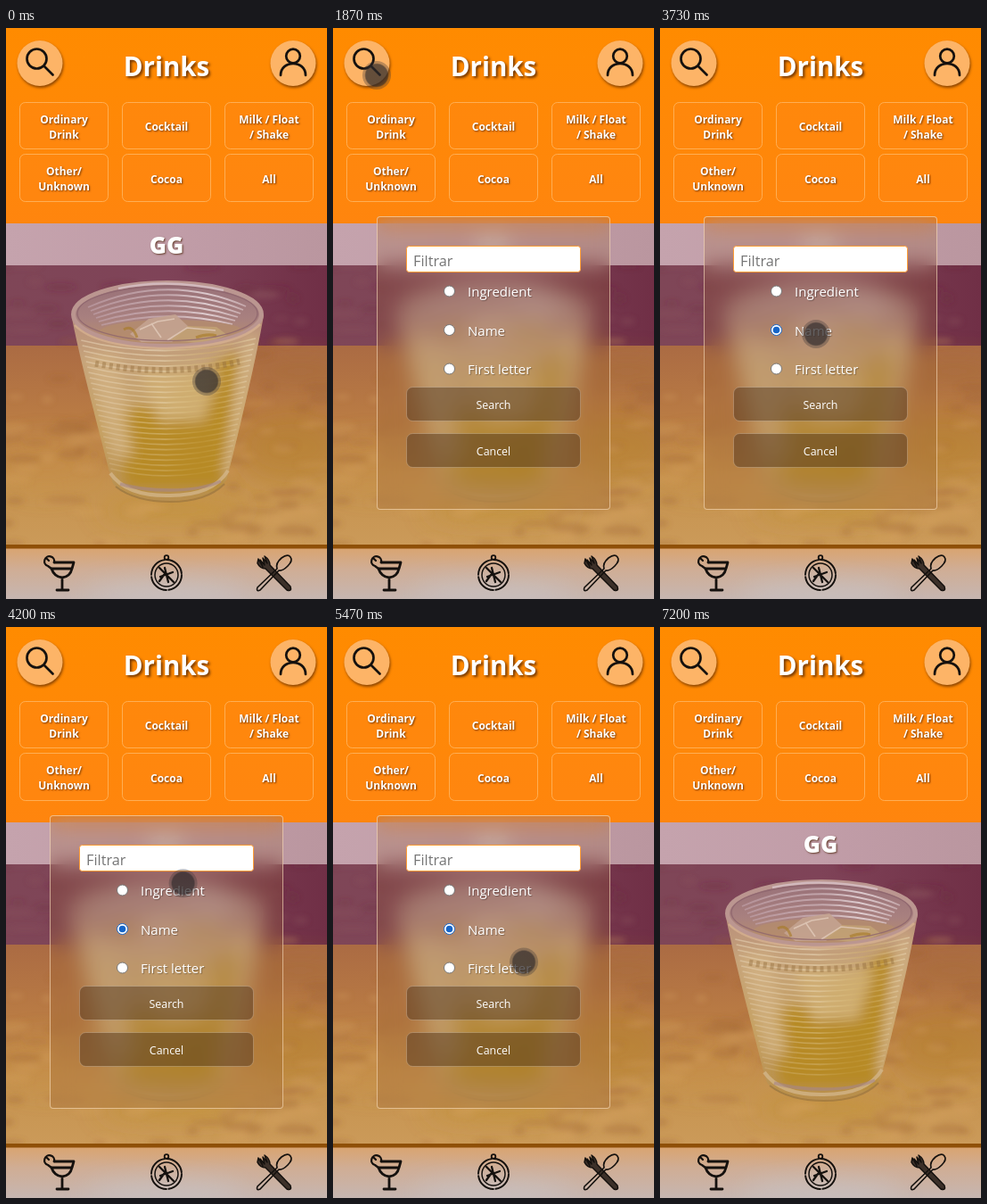
An HTML page that plays this animation: 360 by 640 pixels, repeating every 7470 ms.

```html
<!DOCTYPE html>
<html lang="en">
<head>
<meta charset="utf-8">
<title>Drinks</title>
<style>
  html, body { margin: 0; width: 100%; height: 100%; overflow: hidden; background: #ff8a06; }
  #stage { position: relative; width: 360px; height: 640px; overflow: hidden; font-family: "Open Sans", "Noto Sans", sans-serif; }
  svg { position: absolute; left: 0; top: 0; display: block; }
  text { fill: #fff; }
  .mid { text-anchor: middle; }
  .bold { font-weight: 700; text-shadow: 1px 1px 2px rgba(70, 30, 0, .75); }
  .cat { font-size: 12px; }
  .label { font-size: 15px; text-shadow: 1px 1px 1px rgba(0, 0, 0, .3); }
  .action { font-size: 12.4px; }
  .icon { fill: none; stroke: #15110e; stroke-linecap: round; stroke-linejoin: round; }
  .round { fill: #fdb467; filter: drop-shadow(1px 2px 1.5px rgba(90, 40, 0, .7)); }
  #glassPane {
    position: absolute; box-sizing: border-box; left: 49px; top: 211px; width: 262px; height: 329px;
    border: 1px solid rgba(255, 228, 195, .6); border-radius: 4px;
    background: rgba(150, 95, 50, .24); backdrop-filter: blur(12px);
  }
  #dialog { visibility: hidden; }
  #cursor {
    position: absolute; left: -16px; top: -16px; width: 32px; height: 32px; border-radius: 50%;
    background: radial-gradient(circle closest-side, rgba(46, 42, 44, .74) 0 76%, rgba(60, 54, 56, .34) 86% 100%);
  }
</style>
</head>
<body>
<div id="stage">
  <svg width="360" height="640" viewBox="0 0 360 640">
    <defs>
      <linearGradient id="head" x2="0" y2="1"><stop stop-color="#ff8b00"/><stop offset="1" stop-color="#ff850e"/></linearGradient>
      <linearGradient id="wall"><stop stop-color="#7f4657"/><stop offset=".5" stop-color="#7f4358"/><stop offset="1" stop-color="#702f46"/></linearGradient>
      <linearGradient id="table" x2="0" y2="1"><stop stop-color="#ab6b43"/><stop offset=".35" stop-color="#b97b44"/><stop offset=".7" stop-color="#c6934f"/><stop offset="1" stop-color="#cb9a59"/></linearGradient>
      <linearGradient id="bar"><stop stop-color="#c5a3ad"/><stop offset=".5" stop-color="#c19dA8"/><stop offset="1" stop-color="#ba969f"/></linearGradient>
      <linearGradient id="nav" x2="0" y2="1"><stop stop-color="#d9a470"/><stop offset=".4" stop-color="#d0ad94"/><stop offset="1" stop-color="#c6b6b1"/></linearGradient>
      <linearGradient id="body" x2="0" y2="1"><stop stop-color="#b98f7c"/><stop offset=".25" stop-color="#c5a279"/><stop offset=".6" stop-color="#c5a060"/><stop offset="1" stop-color="#b88f50"/></linearGradient>
      <linearGradient id="rib"><stop stop-color="#e6d2b4"/><stop offset=".45" stop-color="#efe0c2"/><stop offset=".75" stop-color="#d6b566" stop-opacity=".6"/><stop offset="1" stop-color="#ead9b8"/></linearGradient>
      <linearGradient id="backRib" gradientUnits="userSpaceOnUse" x1="90" x2="270"><stop stop-color="#bb9aa2"/><stop offset=".5" stop-color="#cdb4ba"/><stop offset=".75" stop-color="#f1e6ea"/><stop offset="1" stop-color="#cfb5b8"/></linearGradient>
      <linearGradient id="inside" x2="0" y2="1"><stop stop-color="#987078"/><stop offset=".55" stop-color="#a8807f"/><stop offset="1" stop-color="#b98f6c"/></linearGradient>
      <filter id="soft" x="-50%" y="-80%" width="200%" height="260%"><feGaussianBlur stdDeviation="14"/></filter>
      <filter id="blur7" x="-50%" y="-50%" width="200%" height="200%"><feGaussianBlur stdDeviation="7"/></filter>
      <filter id="blur3"><feGaussianBlur stdDeviation="3"/></filter>
      <clipPath id="photo"><path d="M0 219H360V580H0Z"/></clipPath>
      <path id="cup" d="M74 325C80 360 109 470 119 508C130 538 237 538 248 504C257 470 281 370 289 322Z"/>
      <clipPath id="inCup"><use href="#cup"/></clipPath>
    </defs>

    <g clip-path="url(#photo)">
      <path d="M0 219H360V358H0Z" fill="url(#wall)"/>
      <path d="M0 356H360V580H0Z" fill="url(#table)"/>
      <g filter="url(#soft)">
        <ellipse cx="320" cy="470" rx="60" ry="40" fill="#b5812f" opacity=".5"/>
        <ellipse cx="45" cy="490" rx="60" ry="28" fill="#c88f48" opacity=".5"/>
        <ellipse cx="330" cy="385" rx="60" ry="15" fill="#a4683a" opacity=".5"/>
        <ellipse cx="190" cy="540" rx="85" ry="12" fill="#c09236" opacity=".7"/>
      </g>
      <g id="mottle" filter="url(#blur3)"></g>

      <use href="#cup" fill="url(#body)"/>
      <g clip-path="url(#inCup)">
        <g filter="url(#blur7)">
          <path d="M165 425L262 360L242 515H136L122 430Z" fill="#b78a22" opacity=".95"/>
          <path d="M150 385H240L222 440H172Z" fill="#d0ae74" opacity=".95"/>
          <path d="M90 365H125L142 480H120Z" fill="#d3b282" opacity=".8"/>
          <path d="M276 345L250 500" stroke="#d5b584" stroke-width="10"/>
        </g>
        <g id="ridges" fill="none" stroke="url(#rib)"></g>
        <path d="M100 376Q181 392 262 374" fill="none" stroke="#94703f" stroke-width="7" stroke-dasharray="4 4" opacity=".45"/>
      </g>
      <ellipse cx="181" cy="321" rx="107" ry="36" fill="url(#inside)"/>
      <path id="backRidges" fill="none" stroke="url(#backRib)" stroke-width="1.8" opacity=".75"/>
      <ellipse cx="186" cy="341" rx="82" ry="14" fill="#b48d6c" opacity=".75"/>
      <path d="M139 343L160 326L190 321L205 335L186 352L152 352Z" fill="#c5a391" opacity=".9"/>
      <path d="M184 350L204 334L236 335L248 344L224 354Z" fill="#c2a175" opacity=".9"/>
      <path d="M150 338L170 329L189 326M181 350L203 336L235 339M163 331L174 347" fill="none" stroke="#e0c8b8" stroke-width="1.6" opacity=".85"/>
      <path d="M132 338Q142 332 147 347M213 347Q226 342 236 345" fill="none" stroke="#a77a24" stroke-width="3" opacity=".6"/>
      <ellipse cx="181" cy="321" rx="105.500" ry="35.500" fill="none" stroke="#bb9690" stroke-width="5"/>
      <ellipse cx="181" cy="320" rx="101" ry="30.500" fill="none" stroke="#8e656d" stroke-width="1.400" opacity=".8"/>
      <path d="M126 292Q181 280 244 294" fill="none" stroke="#d9c2c9" stroke-width="2.500" opacity=".8"/>
      <path d="M77 333Q101 358 181 359Q260 357 285 332" fill="none" stroke="#d5b08f" stroke-width="2.500" opacity=".85"/>
      <path d="M117 499Q135 525 184 524Q232 524 249 496" fill="none" stroke="#d4b78c" stroke-width="4" opacity=".75"/>
      <path d="M123 514Q145 531 184 531Q225 531 245 511" fill="none" stroke="#93703f" stroke-width="2" opacity=".6"/>
      <path d="M128 511Q150 518 184 518Q218 518 241 508" fill="none" stroke="#a5868a" stroke-width="3.500" opacity=".6"/>
    </g>

    <path d="M0 219H360V266H0Z" fill="url(#bar)"/>
    <text class="mid bold" x="180" y="252.500" font-size="26" style="font-weight:800">GG</text>

    <path d="M0 0H360V219H0Z" fill="url(#head)"/>
    <circle class="round" cx="38" cy="39.500" r="25.500"/>
    <circle class="round" cx="322" cy="39.500" r="25.500"/>
    <g class="icon" stroke-width="2.700">
      <circle cx="34.500" cy="34.500" r="11"/><path d="M43 43L52.500 52.500"/>
      <circle cx="322" cy="31.500" r="7.800"/><path d="M308 53C308 35.500 336 35.500 336 53"/>
    </g>
    <text class="mid bold" x="180" y="54" font-size="29.500" style="text-shadow:2px 2px 3px rgba(80,35,0,.8)">Drinks</text>
    <g id="cats"></g>

    <path d="M0 583H360V640H0Z" fill="url(#nav)"/>
    <ellipse cx="180" cy="634" rx="90" ry="14" fill="#c9c4c6" opacity=".7" filter="url(#soft)"/>
    <path d="M0 579H360V583.500H0Z" fill="#8f5008"/>
    <g class="icon" stroke-width="2.800">
      <path d="M54 599H76M51 606H74Q72 615 63 616Q54 615 51 606M76 599L74 606M63 616V630M57 630H70"/>
      <path d="M54 599A5.500 5.500 0 1 0 47 603L51 606M48 597L45 594" stroke-width="2.300"/>
      <circle cx="180" cy="613" r="17" stroke-width="2" stroke-dasharray="24 2.700"/>
      <circle cx="180" cy="613" r="13" stroke-width="1.500"/>
      <circle cx="180" cy="593.500" r="2.300" stroke-width="1.800"/>
      <path d="M172 605L188 621M178 605L182 621M173 615L187 610M177 613L172 620" stroke-width="2.300"/>
      <path d="M283 595L282 600Q285 606 291 606L315 630Q321 632 319 626L296 602Q296 596 290 592L293 600L288 594L290 602L285 596L288 604Z" fill="#3c3029" stroke-width="1.500"/>
      <path d="M304 606Q302 600 309 594Q316 589 319 593Q322 597 316 603Q310 609 306 608L285 630Q280 632 282 627Z" stroke-width="1.700"/>
    </g>
  </svg>

  <div id="dialog">
    <div id="glassPane"></div>
    <svg width="360" height="640" viewBox="0 0 360 640">
      <rect x="82.500" y="244.500" width="195" height="29" rx="3" fill="#fff" stroke="#ff9d35"/>
      <text x="90" y="266.500" font-size="16.300" style="fill:#757575">Filtrar</text>
      <g id="radios"></g>
      <g id="actions"></g>
    </svg>
  </div>
  <div id="cursor"></div>
</div>

<script>
  const $ = id => document.getElementById(id);
  const LOOP = 7470, FPS = 15;

  // Header categories, one entry per button, lines split by "|"
  $('cats').innerHTML = ['Ordinary|Drink', 'Cocktail', 'Milk / Float|/ Shake', 'Other/|Unknown', 'Cocoa', 'All']
    .map((name, i) => {
      const x = 15.5 + i % 3 * 115, y = i < 3 ? 83.5 : 141.5, h = i < 3 ? 52 : 53;
      const lines = name.split('|');
      const first = y + h / 2 + 5.5 - (lines.length - 1) * 8.5;
      return `<rect x="${x}" y="${y}" width="99" height="${h}" rx="6" fill="#ff8812" fill-opacity=".5" stroke="#ffb866" stroke-opacity=".8"/>` +
        lines.map((s, n) => `<text class="mid bold cat" x="${x + 49.5}" y="${first + n * 17}">${s}</text>`).join('');
    }).join('');

  $('radios').innerHTML = ['Ingredient', 'Name', 'First letter'].map((name, i) => {
    const y = 295 + i * 43.5;
    return `<circle cx="130.5" cy="${y}" r="6" fill="#fff" stroke="#767676"/>` +
      `<circle class="dot" cx="130.5" cy="${y}" r="3.8" fill="none"/>` +
      `<text class="label" x="151" y="${y + 6}">${name}</text>`;
  }).join('');

  $('actions').innerHTML = ['Search', 'Cancel'].map((name, i) => {
    const y = 402.5 + i * 52;
    return `<rect x="82.5" y="${y}" width="195" height="38" rx="7" fill="#4a321d" fill-opacity=".45" stroke="#fff" stroke-opacity=".22"/>` +
      `<text class="mid action" x="180" y="${y + 24}">${name}</text>`;
  }).join('');

  // Soft mottling of the wall and the table
  let seed = 7;
  const rand = () => (seed = seed * 16807 % 2147483647) / 2147483647;
  let spots = '';
  for (let i = 0; i < 150; i++) {
    const x = rand() * 360, y = 266 + rand() * 314, light = rand() > .5;
    const color = y < 350 ? (light ? '#8f5a62' : '#682a3c') : (light ? '#d6a263' : '#9c5f30');
    spots += `<ellipse cx="${x}" cy="${y}" rx="${6 + rand() * 18}" ry="${2 + rand() * 4}" fill="${color}" opacity=".28"/>`;
  }
  $('mottle').innerHTML = spots;

  // Ribbed glass
  let ribs = '';
  for (let i = 0; i < 25; i++) {
    const y = 350 + i * 6, l = 82 + (y - 340) * .23, r = 282 - (y - 340) * .21, sag = 24 - i * .3;
    ribs += `<path d="M${l} ${y}Q${(l + r) / 2} ${y + sag} ${r} ${y - 2}" stroke-width="1.8" opacity="${.55 - i * .014}"/>`;
  }
  $('ridges').innerHTML = ribs;
  let back = '';
  for (let i = 0; i < 6; i++) back += `M${92 + i * 3} ${313 + i * 4}Q181 ${274 + i * 8} ${269 - i * 3} ${312 + i * 4}`;
  $('backRidges').setAttribute('d', back);

  // Pointer path: [tick, x, y]
  const path = [
    [0, 225, 396], [5, 65, 168], [7, 65, 168], [8, 74, 115], [9, 74, 115], [14, 47, 54], [15, 49, 53],
    [34, 49, 53], [41, 184, 299], [48, 184, 299], [54, 175, 343], [57, 175, 343], [64, 200, 284],
    [66, 200, 284], [72, 197, 290], [74, 204, 273], [77, 204, 273], [87, 224, 478], [97, 224, 478], [105, 70, 643]
  ];

  function pointer(tick) {
    const n = path.findIndex(p => p[0] > tick);
    if (n < 0) return path[path.length - 1].slice(1);
    const [a, x, y] = path[n - 1], [b, x2, y2] = path[n];
    const u = (tick - a) / (b - a), e = u * u * (3 - 2 * u);
    return [x + (x2 - x) * e, y + (y2 - y) * e];
  }

  const dots = [...document.querySelectorAll('.dot')];

  function draw(ms) {
    const tick = Math.floor((ms % LOOP + 4) * FPS / 1000);
    const [x, y] = pointer(tick);
    $('cursor').style.transform = `translate(${x}px, ${y}px)`;
    $('cursor').style.visibility = tick < 108 ? 'visible' : 'hidden';
    $('dialog').style.visibility = tick >= 28 && tick < 90 ? 'visible' : 'hidden';
    const chosen = tick < 47 ? -1 : tick < 56 ? 0 : 1;
    dots.forEach((dot, i) => {
      const on = i === chosen;
      dot.setAttribute('fill', on ? '#1565c8' : 'none');
      dot.previousElementSibling.setAttribute('stroke', on ? '#1565c8' : '#767676');
    });
  }

  const start = performance.now();
  function loop() {
    draw(performance.now() - start);
    requestAnimationFrame(loop);
  }
  loop();
</script>
</body>
</html>
```
